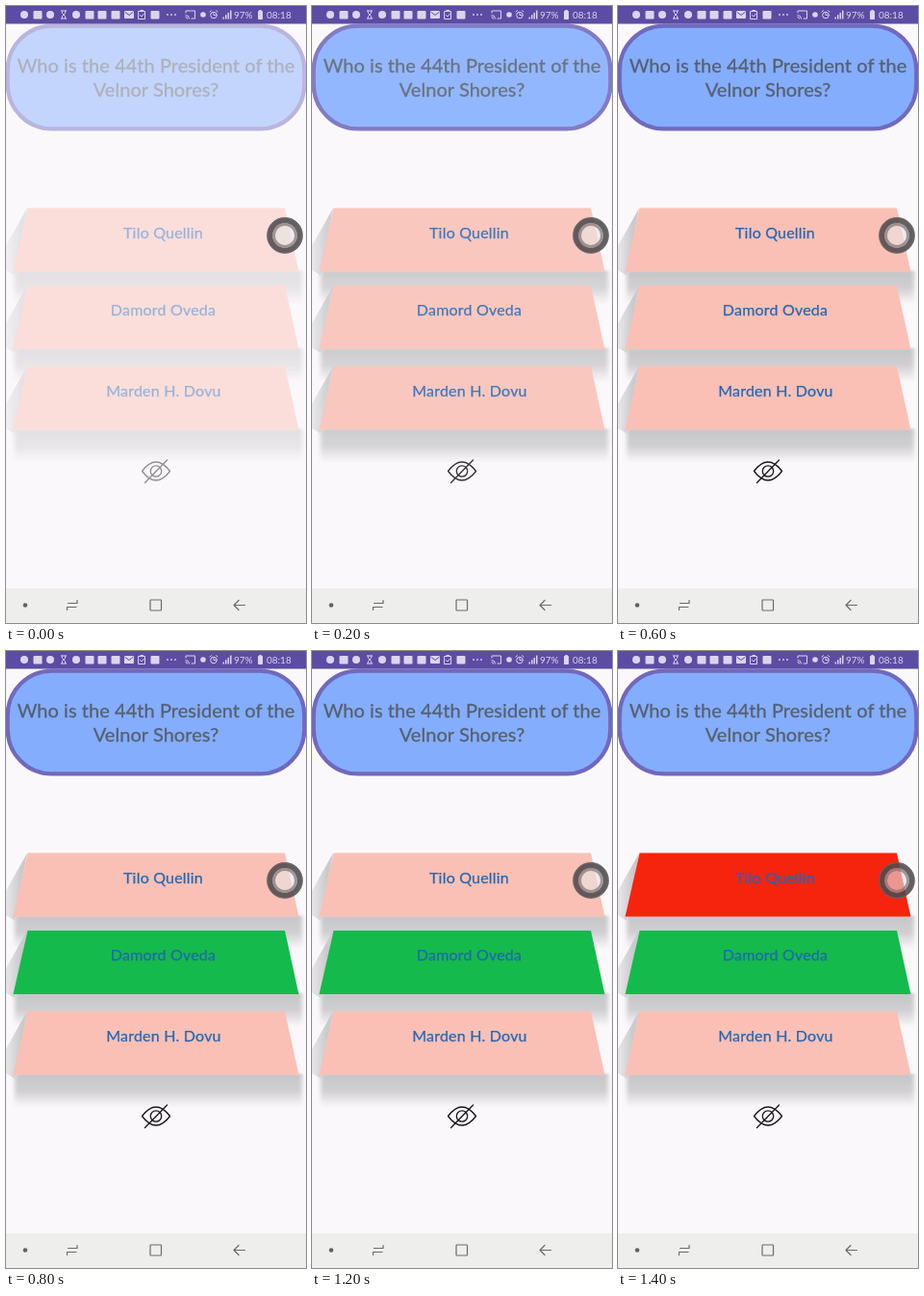
An HTML page that plays this animation: 312x640 px, repeating every 1600 ms.

```html
<!DOCTYPE html>
<html lang="en">
<head>
<meta charset="utf-8">
<title>Quiz</title>
<style>
  html, body { margin: 0; width: 100%; height: 100%; overflow: hidden; background: #fbf8fb; }
  svg { display: block; width: 100vw; height: 100vh; }
  text { font-family: Lato, "Open Sans", sans-serif; }
  .question { font-size: 20px; letter-spacing: .05px; fill: #56606f; stroke: #56606f; stroke-width: .3; text-anchor: middle; }
  .answer { font-size: 16px; letter-spacing: .2px; fill: #2167b5; stroke: #2167b5; stroke-width: .25; text-anchor: middle; }
  .status { font-size: 10px; fill: #dcd4ef; }
  .line { fill: none; stroke-linecap: round; stroke-linejoin: round; }
</style>
</head>
<body>
<svg viewBox="0 0 312 640">
  <defs>
    <linearGradient id="below" x1="0" y1="0" x2="0" y2="1">
      <stop offset="0" stop-color="#c6c5c8"/>
      <stop offset=".5" stop-color="#d0cfd2"/>
      <stop offset="1" stop-color="#d0cfd2" stop-opacity="0"/>
    </linearGradient>
    <linearGradient id="beside" x1="0" y1="0" x2="1" y2="0">
      <stop offset="0" stop-color="#cfced1" stop-opacity=".4"/>
      <stop offset=".7" stop-color="#cbcacd"/>
    </linearGradient>
    <filter id="soft" x="-5%" y="-20%" width="110%" height="140%">
      <feGaussianBlur stdDeviation="2 .8"/>
    </filter>
    <filter id="softEdge"><feGaussianBlur stdDeviation=".7"/></filter>
  </defs>

  <rect width="312" height="640" fill="#fbf8fb"/>

  <g id="page">
    <rect x="1.7" y="20.6" width="308.6" height="106.800" rx="46" fill="#84adfe" stroke="#7169bd" stroke-width="4.2"/>
    <text class="question" x="156" y="69">Who is the 44th President of the</text>
    <text class="question" x="156" y="94">Velnor Shores?</text>
    <g id="cards"></g>
    <g class="line" stroke="#161519" stroke-width="1.300">
      <path d="M141.500 482.500Q156 463.500 170.500 482.500Q156 501.500 141.500 482.500Z"/>
      <circle cx="156" cy="482.500" r="5.700"/>
      <path d="M144.500 494.500L167.500 471"/>
    </g>
  </g>

  <g id="touch" transform="translate(290 238)" fill="none">
    <circle r="15.700" stroke="#4f4b4d" stroke-opacity=".88" stroke-width="6"/>
    <circle r="18.300" stroke="#777375" stroke-opacity=".7" stroke-width="1"/>
    <circle r="11.400" stroke="#918a8c" stroke-opacity=".88" stroke-width="3"/>
    <circle r="10" fill="#e6e4e4" fill-opacity=".6"/>
  </g>

  <rect width="312" height="18.500" fill="#5c4ca3"/>
  <g id="status" fill="#dcd4ef">
    <g id="badges"></g>
    <g class="line" stroke="#dcd4ef">
      <path d="M57.500 5H62.500M57.500 13H62.500M58 5Q58 8 60 9Q62 8 62 5M58 13Q58 10 60 9Q62 10 62 13"/>
      <rect x="138" y="5.500" width="6.500" height="8"/>
      <path d="M139.500 9.500L141 11L143.500 8M140 4.500H142.500"/>
      <path d="M187 7V5H196.500V13H193M187 9.500Q190.500 9.500 190.500 13M187 11.500Q188.500 11.500 188.500 13"/>
      <circle cx="216" cy="9.500" r="3.300"/>
      <path d="M216 7.500V9.500H217.500M212 6L213.500 4.700M220 6L218.500 4.700"/>
    </g>
    <rect x="123" y="5" width="10" height="8" rx="1"/>
    <path class="line" stroke="#5c4ca3" d="M124 6.500L128 9.500L132 6.500"/>
    <g id="dots"></g>
    <g id="signal"></g>
    <rect x="262" y="5" width="5" height="9" rx=".7"/>
    <rect x="263.300" y="4" width="2.400" height="2"/>
  </g>
  <text class="status" x="237" y="13">97%</text>
  <text class="status" x="271" y="13">08:18</text>

  <rect y="604" width="312" height="36" fill="#eeeeec"/>
  <circle cx="20" cy="621.500" r="2.300" fill="#626262"/>
  <g class="line" stroke="#6b6b6b" stroke-width="1.200">
    <path d="M74 616.500V619.500H64.500M63.500 626.500V623.500H73"/>
    <rect x="150" y="616" width="11.500" height="11" rx=".8"/>
    <path d="M248.500 621.500H237.500M242 616.500L237 621.500L242 626.500"/>
  </g>
</svg>
<script>
const NS = "http://www.w3.org/2000/svg";
const byId = id => document.getElementById(id);

function add(parent, tag, attrs, text) {
  const el = document.createElementNS(NS, tag);
  for (const key in attrs) el.setAttribute(key, attrs[key]);
  if (text) el.textContent = text;
  parent.appendChild(el);
  return el;
}

function addCard(name, x, top, bottom) {
  const g = byId("cards");
  add(g, "rect", { x: 9, y: bottom - 1, width: 299, height: 35, fill: "url(#below)", filter: "url(#soft)" });
  add(g, "path", {
    d: `M22 ${top}L-1 ${top + 41}V${bottom - 2}L9 ${bottom + 4}Z`,
    fill: "url(#beside)", filter: "url(#softEdge)"
  });
  const face = add(g, "path", { d: `M22.5 ${top}H290L304.5 ${bottom}H7.500Z` });
  add(g, "text", { class: "answer", x, y: top + 31 }, name);
  return face;
}

const cards = [
  addCard("Tilo Quellin", 163.5, 209.5, 275.5),
  addCard("Damord Oveda", 163.5, 290, 356),
  addCard("Marden H. Dovu", 164, 373.5, 439.5)
];

// Plain app badges in the status bar
for (const x of [19, 46, 73, 205]) add(byId("badges"), "circle", { cx: x, cy: 9, r: x === 205 ? 2.8 : 4 });
for (const x of [33, 87, 100, 114, 155]) add(byId("badges"), "rect", { x: x - 4.5, y: 5, width: 9, height: 8.5, rx: 1 });
for (let i = 0; i < 3; i++) add(byId("dots"), "circle", { cx: 168 + i * 4, cy: 9, r: 0.9 });
for (let i = 0; i < 4; i++) {
  const h = 2 + i * 2.3;
  add(byId("signal"), "rect", { x: 225.5 + i * 2.5, y: 13.5 - h, width: 1.5, height: h });
}

const LOOP = 1600, STEP = 200;
const FADE = [0.47, 0.88];
const PLAIN = "#fac0b5", RIGHT = "#14ba4c", WRONG = "#f6240c";

function draw(ms) {
  const step = Math.floor((ms % LOOP) / STEP);
  byId("page").setAttribute("opacity", FADE[step] ?? 1);
  cards[0].setAttribute("fill", step >= 7 ? WRONG : PLAIN);
  cards[1].setAttribute("fill", step >= 4 ? RIGHT : PLAIN);
  cards[2].setAttribute("fill", PLAIN);
}

const start = performance.now();
function tick() {
  draw(performance.now() - start);
  requestAnimationFrame(tick);
}
tick();
</script>
</body>
</html>
```
